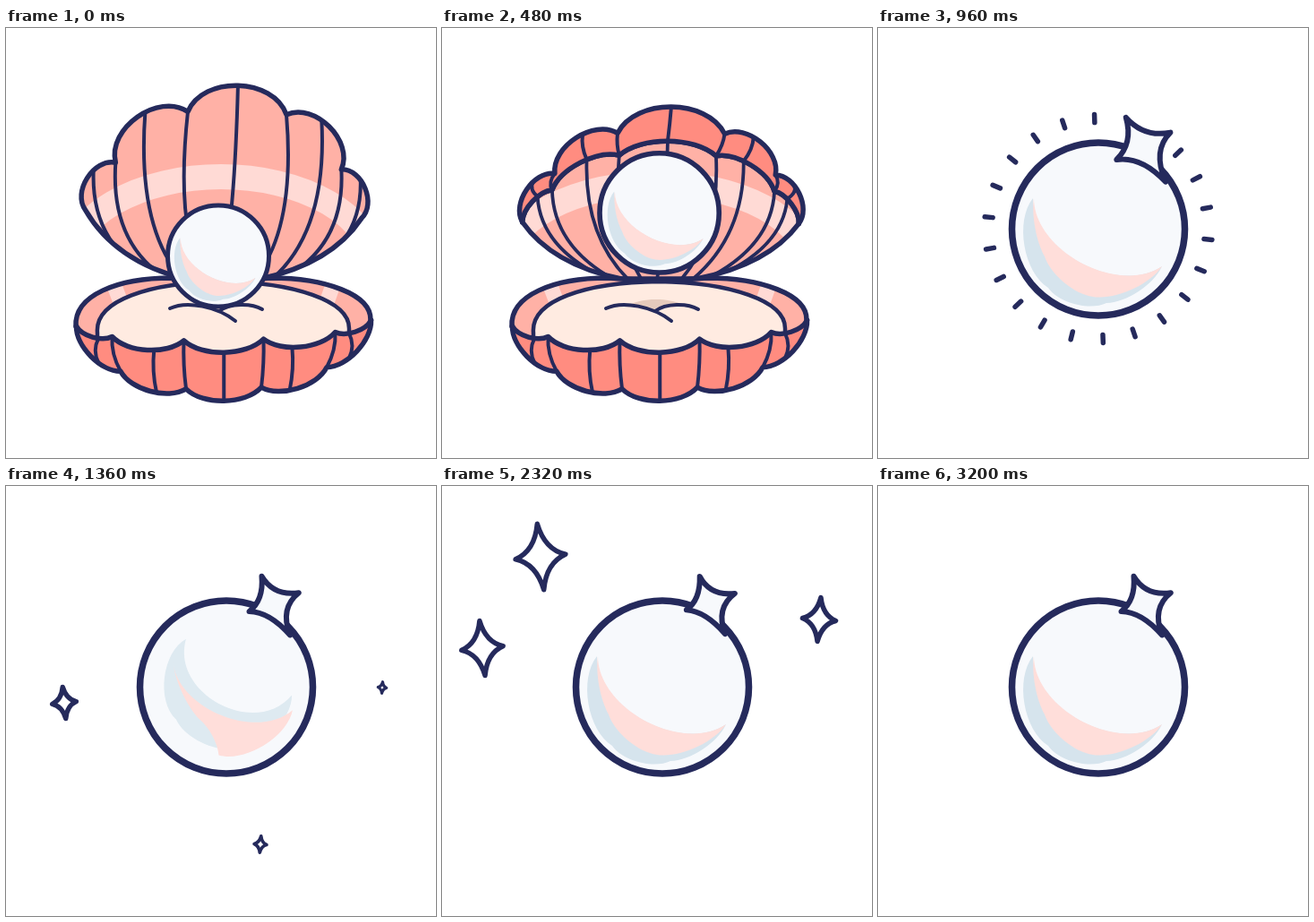
Animation, 480 px wide and 480 px high, one loop 3.28 s. Source, as an HTML page with a canvas:

```html
<!DOCTYPE html>
<html lang="en">
<head>
<meta charset="utf-8">
<title>Pearl and shell</title>
<style>
  html, body { margin: 0; width: 100%; height: 100%; overflow: hidden; background: #fff; }
  canvas { display: block; width: 100vmin; height: 100vmin; }
</style>
</head>
<body>
<canvas id="stage" width="480" height="480"></canvas>
<script>
const ctx = document.getElementById('stage').getContext('2d');
const LOOP = 3280, STEP = 80, HINGE = 280;
const NAVY = '#252a5c', CORAL = '#ff8c80', PINK = '#ffb1a6', PALE = '#ffdad5',
      FLESH = '#ffebe1', PEARL = '#f7f9fc';

const clamp = v => Math.max(0, Math.min(1, v));
const span = (t, a, b) => clamp((t - a) / (b - a));
const smooth = v => v * v * (3 - 2 * v);
const mix = (a, b, k) => Array.isArray(a) ? a.map((v, i) => mix(v, b[i], k)) : a + (b - a) * k;

// Cusps of the scalloped edges as [half width, height above the hinge], outermost first
const LID_OPEN = [[154, 72], [126, 126], [55, 185]];
const BACK_SHUT = [[155, 42], [117, 97], [70, 113]];
const LIP_SHUT = [[155, 42], [120, 39], [52, 35]];
const BASE_LIP = mirror([[164.5, -49.5], [124.5, -62], [44.5, -68]], 243, 0, -.02);
const BASE_FRONT = mirror([[164.5, -49.5], [115, -101], [42, -122]], 243, 0, -.02);
const RIB_AT = [.64, .58, .5, .4, .36];

// Reflections as closed chains of arcs [x, y, bulge], resting and turned
const GLINT = {
  pink: [
    [[174, 190, -.24], [317, 266, .12], [240, 300, .12], [186, 255, .07]],
    [[203, 200, -.26], [324, 228, .25], [234, 301, -.38], [258, 268, .08]]
  ],
  blue: [
    [[173, 190, -.18], [190, 290, -.15], [255, 307, -.12], [317, 266, .24]],
    [[240, 144, -.24], [190, 220, -.15], [262, 272, -.25], [322, 188, .5]]
  ]
};

// Sparkle tips around its centre, small and large
const SPARKLE = [
  [[-6, -31], [33, -12], [22, 33], [-21, 6]],
  [[-26, -33], [32, -18], [31, 45], [-33, 22]]
];

// x, y, half width, start, end
const STARS = [
  [65, 242, 21, 1040, 1840],
  [284, 400, 21, 1215, 2080],
  [420, 225, 25, 1280, 2240],
  [110, 79, 28, 1440, 2720],
  [45, 181, 26, 1780, 3160],
  [421, 149, 24, 1900, 3120]
];

function mirror(halves, axis, lean, tilt) {
  const side = s => ([w, h]) => [axis + lean * (h / 185) ** 2 + s * w, HINGE - h + tilt * s * w];
  return [...halves.map(side(-1)), ...halves.map(side(1)).reverse()];
}

// Round arc from p to q; the bulge is a share of the chord
function arc(p, q, bulge) {
  const dx = q[0] - p[0], dy = q[1] - p[1];
  const out = bulge * 4 / 3, along = Math.max(0, .33 - .66 * Math.abs(bulge));
  const shift = ([x, y], s) => [x + dy * out + s * dx * along, y - dx * out + s * dy * along];
  return [p, shift(p, 1), shift(q, -1), q];
}
function arcTo(path, p, q, bulge) {
  path.bezierCurveTo(...arc(p, q, bulge).slice(1).flat());
}
function arcPoint(p, q, bulge, t) {
  let pts = arc(p, q, bulge);
  while (pts.length > 1) pts = pts.slice(1).map((b, i) => mix(pts[i], b, t));
  return pts[0];
}
function edge(path, pts, bulge) {
  path.lineTo(...pts[0]);
  pts.slice(1).forEach((q, i) => arcTo(path, pts[i], q, bulge));
  return path;
}
function ribPoints(pts, bulge) {
  return [...pts.slice(1, -1), ...RIB_AT.map((t, i) => arcPoint(pts[i], pts[i + 1], bulge, t))];
}

function line(path, width, color = NAVY) {
  ctx.lineWidth = width;
  ctx.strokeStyle = color;
  ctx.stroke(path);
}
function fill(path, color) {
  ctx.fillStyle = color;
  ctx.fill(path);
}
function scaled(x, y, s, draw) {
  ctx.save();
  ctx.translate(x, y);
  ctx.scale(s, s);
  ctx.translate(-x, -y);
  draw();
  ctx.restore();
}
function clipped(path, draw) {
  ctx.save();
  ctx.clip(path);
  draw();
  ctx.restore();
}

// Coral strip between two scalloped edges
function strip(far, farBulge, near, nearBulge, glow) {
  const body = edge(edge(new Path2D(), far, farBulge), [...near].reverse(), -nearBulge);
  fill(body, CORAL);
  clipped(body, () => {
    ctx.globalAlpha = glow;
    line(edge(new Path2D(), mix(far, near, .42), .1), 13, PINK);
  });
  const ribs = new Path2D(), ends = ribPoints(near, nearBulge);
  ribPoints(far, farBulge).forEach((p, i) => {
    const [x, y] = mix(p, ends[i], .5);
    ribs.moveTo(...p);
    ribs.quadraticCurveTo(x + (x - 245) * .05, y, ...ends[i]);
  });
  line(ribs, 4);
  line(edge(new Path2D(), far, farBulge), 5.5);
  line(edge(new Path2D(), near, nearBulge), 5.5);
}

function lid(shut) {
  const pose = end => mirror(mix(LID_OPEN, end, shut), 240 + 6 * shut, 18, mix(.03, -.045, shut));
  const back = pose(BACK_SHUT), lip = pose(LIP_SHUT);
  const backBulge = mix(.28, .18, shut), lipBulge = mix(.28, -.13, shut);
  const l = lip[0], r = lip[5], low = p => mix(p[1], HINGE, .75);
  const inside = edge(new Path2D(), lip, lipBulge);
  inside.quadraticCurveTo(mix(r[0], 284, .3), low(r), 284, HINGE);
  inside.lineTo(200, HINGE);
  inside.quadraticCurveTo(mix(l[0], 200, .3), low(l), ...l);
  fill(inside, PINK);
  clipped(inside, () => {
    const band = new Path2D();
    band.ellipse(240, 266, 170, mix(100, 25, shut ** 2), 0, 0, 7);
    line(band, 28, PALE);
    const ribs = new Path2D(), open = 1 - shut;
    for (const [x, y] of ribPoints(lip, lipBulge)) {
      const side = Math.abs(x - 250) < 20 ? 0 : Math.sign(x - 240);
      const foot = 240 + side * Math.abs(x - 240) * (.2 + .3 * open);
      ribs.moveTo(x, y);
      ribs.quadraticCurveTo(mix(x, foot, .2) + side * 18 * open, mix(y, HINGE, mix(.7, .5, shut)), foot, HINGE + 1);
    }
    line(ribs, mix(4, 3.4, shut));
  });
  line(inside, 5.5);
  if (shut > 0) strip(back, backBulge, lip, lipBulge, span(shut, .4, 1));
}

const RIM = 'M78 333C76 298 125 279 185 279Q242 284 296 279C355 279 408 297 407 326';
function base() {
  const bowl = edge(new Path2D(RIM), [...BASE_LIP].reverse(), .16);
  fill(bowl, PINK);
  clipped(bowl, () => {
    line(new Path2D('M118 280L128 306M366 284L356 312'), 17, PALE);
    const flesh = new Path2D('M102 340C99 304 160 284 242 283C320 284 384 304 383 336L383 375H102Z');
    fill(flesh, FLESH);
    line(flesh, 4.5);
    fill(new Path2D('M208 310C222 301 252 301 269 309Q252 308 241 316Q226 310 208 310Z'), '#e5cabc');
  });
  line(new Path2D('M183 313C202 304 236 311 256 327M238 316C250 307 274 307 286 314'), 4);
  line(new Path2D(RIM), 5.5);
  strip(BASE_FRONT, -.17, BASE_LIP, -.16, 0);
}

// The closing shell shrinks away behind the pearl
function shell(t) {
  const gone = span(t, 640, 880) ** 1.3;
  if (gone === 1) return;
  scaled(244, 240, 1 - gone, () => {
    lid(span(t, 0, 640) ** 4);
    scaled(242, 290, t > 560 ? .94 : 1, base);
  });
}

function pearl(t) {
  const rise = span(t, 0, 640) ** 2, settle = smooth(span(t, 640, 900));
  const [x, y, r] = mix(mix([237, 254.5, 56.5], [247, 169, 74.5], rise), [246, 224.5, 96.5], settle);
  const turn = smooth(t < 1760 ? span(t, 1040, 1760) : 1 - span(t, 1760, 2280));
  const disc = new Path2D();
  disc.arc(x, y, r, 0, 7);
  fill(disc, PEARL);
  ctx.save();
  ctx.translate(x, y);
  ctx.scale(r / 96.5, r / 96.5);
  ctx.translate(-246, -224.5);
  const glint = (keys, color) => {
    const pts = mix(...keys, turn), path = new Path2D();
    path.moveTo(pts[0][0], pts[0][1]);
    pts.forEach((p, i) => arcTo(path, p.slice(0, 2), pts[(i + 1) % pts.length].slice(0, 2), p[2]));
    fill(path, color);
  };
  glint(GLINT.blue, `rgb(${mix([214, 228, 237], [232, 242, 247], turn).map(Math.round)})`);
  glint(GLINT.pink, '#ffdeda');
  ctx.restore();
  line(disc, r / 16 + 1.5);
}

function rays(t) {
  const size = 1 - Math.abs(t - 960) / 170, r = 123 + (t - 960) / 16;
  if (size <= 0) return;
  const path = new Path2D();
  for (let i = 0; i < 20; i++) {
    const a = (-92 - i * 16.4) * Math.PI / 180;
    const at = d => [246 + Math.cos(a) * (r + d * size), 224 + Math.sin(a) * (r + d * size)];
    path.moveTo(...at(-4.5));
    path.lineTo(...at(4.5));
  }
  line(path, 5.5);
}

function starPath(tips) {
  const path = new Path2D();
  path.moveTo(...tips[0]);
  tips.forEach((a, i) => {
    const b = tips[(i + 1) % 4];
    path.quadraticCurveTo(...mix([0, 0], mix(a, b, .5), .4), ...b);
  });
  path.closePath();
  return path;
}

// Each star grows, then breaks into four dashes
function stars(t) {
  for (const [x, y, w, start, end] of STARS) {
    if (t <= start || t >= end) continue;
    const s = w * (1 - (1 - span(t, start, start + 800)) ** 2), h = s * 1.32;
    const tips = [[0, -h], [s, 0], [0, h], [-s, 0]], left = (end - t) / 160;
    ctx.save();
    ctx.translate(x, y);
    ctx.rotate(x < 240 ? -.1 : .08);
    if (left > 1) line(starPath(tips), Math.min(5.5, 2 + s / 4));
    else {
      const dashes = new Path2D();
      for (const p of tips) {
        dashes.moveTo(...p);
        dashes.lineTo(...mix(p, [0, 0], .3 * left));
      }
      line(dashes, 5);
    }
    ctx.restore();
  }
}

function sparkle(t) {
  const grow = span(t, 800, 960);
  if (!grow) return;
  const pulse = .5 + .5 * Math.cos((t - 1760) / 1040 * 2 * Math.PI);
  const path = starPath(mix(...SPARKLE, pulse).map(p => p.map(v => v * grow)));
  ctx.save();
  ctx.translate(294, 132);
  fill(path, PEARL);
  line(path, 6);
  ctx.restore();
}

function frame(now) {
  const t = Math.floor(now % LOOP / STEP) * STEP;
  fill(new Path2D('M0 0H480V480H0Z'), '#fff');
  ctx.lineCap = ctx.lineJoin = 'round';
  shell(t);
  rays(t);
  pearl(t);
  stars(t);
  sparkle(t);
}

const begin = performance.now();
(function tick() {
  frame(performance.now() - begin);
  requestAnimationFrame(tick);
})();
</script>
</body>
</html>
```
